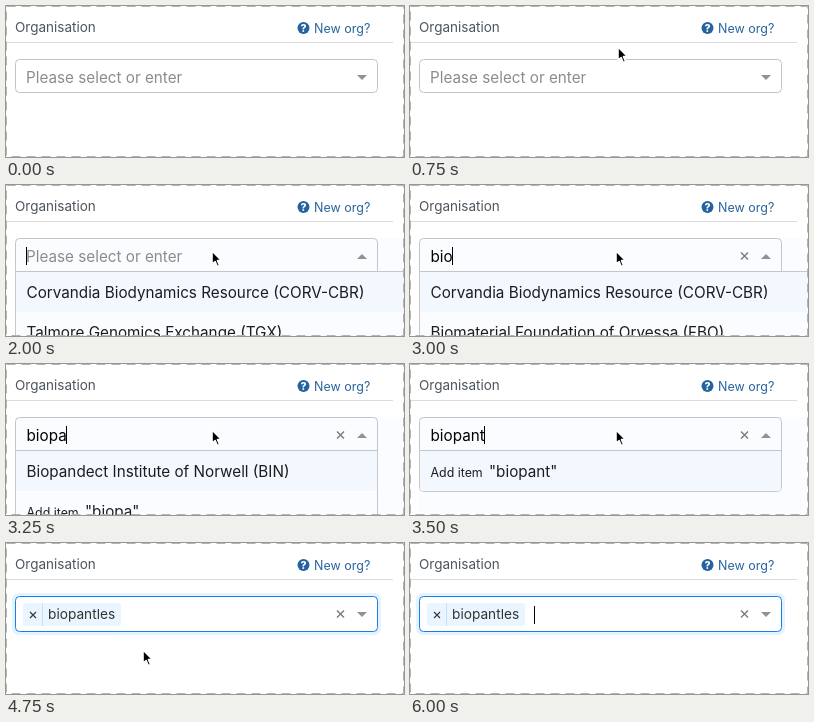
Write an HTML page that moves like this. It is 398 by 151 pixels and loops after 6.5 s.

```html
<!DOCTYPE html>
<html lang="en">
<head>
<meta charset="utf-8">
<title>Organisation picker</title>
<style>
  html, body { margin: 0; width: 100%; height: 100%; overflow: hidden; background: #fff; }
  svg { display: block; width: 398px; height: 151px; }
  text { font-family: Inter, "Liberation Sans", sans-serif; font-size: 15.25px; fill: #1d1d1f; white-space: pre; }
  .small { font-size: 12.4px; }
  .placeholder { fill: #8c8c8c; }
  .typed { fill: #000; }
  .cross { fill: none; stroke: #7a7a7a; stroke-width: 1.4; }
</style>
</head>
<body>
<svg viewBox="0 0 398 151">
  <text x="9" y="26" style="font-size:13.5px;fill:#4d555c">Organisation</text>
  <circle cx="297.5" cy="22" r="6" fill="#24639f"/>
  <text x="297.5" y="26" text-anchor="middle" style="font-size:10.5px;font-weight:800;fill:#fff">?</text>
  <text x="308" y="27" style="font-size:12.5px;fill:#2a659c">New org?</text>
  <path d="M0 36.5H387" stroke="#dcdcdc"/>

  <g id="panel">
    <rect x="9" y="53" width="389" height="98" fill="#fafcff"/>
    <path id="panelBox" fill="#fafcff" stroke="#c6c8cb"/>
    <path id="marked" fill="#f2f8fd"/>
    <text id="row0" x="20.5" y="113"></text>
    <text id="row1" x="20.5" y="153"></text>
    <g id="add">
      <text class="small" x="20.5" y="113">Add item</text>
      <text id="addName" x="79" y="113"></text>
    </g>
  </g>

  <rect id="ring" x="8" y="52" width="365" height="38" rx="5" fill="none" stroke="#007eff" stroke-opacity=".1" stroke-width="4"/>
  <path id="box"/>
  <text id="placeholder" class="placeholder" x="20" y="77">Please select or enter</text>
  <text id="typed" class="typed" x="20.5" y="77"></text>
  <g id="chip">
    <rect x="17" y="60" width="98" height="23" rx="2" fill="#ebf5ff"/>
    <path d="M36.5 60V83" stroke="#c2e0ff"/>
    <path class="cross" d="M24 69l6 6m0-6l-6 6" style="stroke:#333;stroke-width:1.1"/>
    <text id="chipName" x="42" y="76" style="font-size:13.7px;fill:#333"></text>
  </g>
  <path id="clear" class="cross" d="M331 67.5l7 7m0-7l-7 7"/>
  <path id="arrow" fill="#929292"/>
  <rect id="caret" width="1" height="18" fill="#000"/>

  <rect x=".5" y=".5" width="397" height="150" fill="none" stroke="#b4b4b4" stroke-dasharray="9 6"/>
  <path id="pointer" d="M0 0V13.4L3.1 10.5L5.3 15.6L7.7 14.6L5.5 9.6H9.7Z" fill="#000" stroke="#fff" stroke-width="1.6" stroke-linejoin="round"/>
</svg>
<script>
const LOOP = 6500;
const NAME = 'biopantles';
const OPEN = 2000, NARROW = 3250, NO_MATCH = 3500, PICKED = 4750;
const FIRST_ORG = 'Corvandia Biodynamics Resource (CORV-CBR)';

// Each list holds [start time, value]; a value lasts until the next start.
const pointerSteps = [[0, null], [750, [208, 41]], [1250, [206, 49]], [1750, [206, 66]],
  [4250, [200, 68]], [4500, [137, 107]], [5750, null]];
const letterSteps = [[0, 0], [2750, 2], [3000, 3], [3250, 5], [3500, 7], [3750, 9], [4000, 10], [PICKED, 0]];
const caretSteps = [[0, 0], [OPEN, 1], [2500, 0], [2750, 1], [4500, 0], [5000, 1], [5500, 0], [6000, 1]];
const rowSteps = [
  [0, ['', '']],
  [OPEN, [FIRST_ORG, 'Talmore Genomics Exchange (TGX)']],
  [2750, [FIRST_ORG, 'Biomaterial Foundation of Orvessa (FBO)']],
  [NARROW, ['Biopandect Institute of Norwell (BIN)', '']],
  [NO_MATCH, ['', '']]
];

const el = {};
document.querySelectorAll('[id]').forEach(node => el[node.id] = node);
const valueAt = (steps, t) => steps.filter(([start]) => start <= t).pop()[1];
const show = (node, on) => node.setAttribute('visibility', on ? 'inherit' : 'hidden');
const set = (node, attrs) => { for (const k in attrs) node.setAttribute(k, attrs[k]); };
const write = (node, s) => { if (node.textContent !== s) node.textContent = s; };

// Rectangle with separate corner radii at the top and the bottom.
function roundBox(x1, y1, x2, y2, top, bottom) {
  return `M${x1} ${y1 + top}q0 ${-top} ${top} ${-top}H${x2 - top}q${top} 0 ${top} ${top}` +
    `V${y2 - bottom}q0 ${bottom} ${-bottom} ${bottom}H${x1 + bottom}q${-bottom} 0 ${-bottom} ${-bottom}Z`;
}

function drawPanel(t, text) {
  const wide = t < NARROW, addOnly = t >= NO_MATCH;
  const right = wide ? 420 : 371.5;
  set(el.panelBox, { d: roundBox(9.5, 86.5, right, addOnly ? 127.5 : 168, 0, 4) });
  set(el.marked, { d: roundBox(10, 87, right - .5, 127, 0, addOnly ? 3 : 0) });
  const rows = valueAt(rowSteps, t);
  write(el.row0, rows[0]);
  write(el.row1, rows[1]);
  show(el.add, t >= NARROW && t < PICKED);
  set(el.add, { transform: `translate(0 ${addOnly ? 0 : 40})` });
  write(el.addName, `"${text}"`);
}

function draw(t) {
  const open = t >= OPEN && t < PICKED, picked = t >= PICKED;
  const text = NAME.slice(0, valueAt(letterSteps, t));

  show(el.panel, open);
  drawPanel(t, text);
  if (!open) show(el.add, false);

  show(el.ring, picked);
  set(el.box, {
    d: roundBox(9.5, 53.5, 371.5, picked ? 88.5 : 86.5, 4, open ? 0 : 4),
    fill: open ? '#fafcff' : '#fff',
    stroke: picked ? '#1680e8' : open ? '#c3c5c8' : '#c4c4c4'
  });
  show(el.placeholder, !text && !picked);
  write(el.typed, text);
  show(el.chip, picked);
  write(el.chipName, NAME);
  show(el.clear, text || picked);
  set(el.arrow, { d: open ? 'M351 74H361L356 69Z' : 'M351 69H361L356 74Z' });

  const end = text ? Math.floor(20 + el.typed.getComputedTextLength()) : 20;
  set(el.caret, { x: picked ? 124 : end, y: picked ? 63 : 62 });
  show(el.caret, valueAt(caretSteps, t));

  const at = valueAt(pointerSteps, t);
  show(el.pointer, at);
  if (at) set(el.pointer, { transform: `translate(${at})` });
}

const begin = performance.now();
function tick() {
  draw((performance.now() - begin) % LOOP);
  requestAnimationFrame(tick);
}
tick();
</script>
</body>
</html>
```
